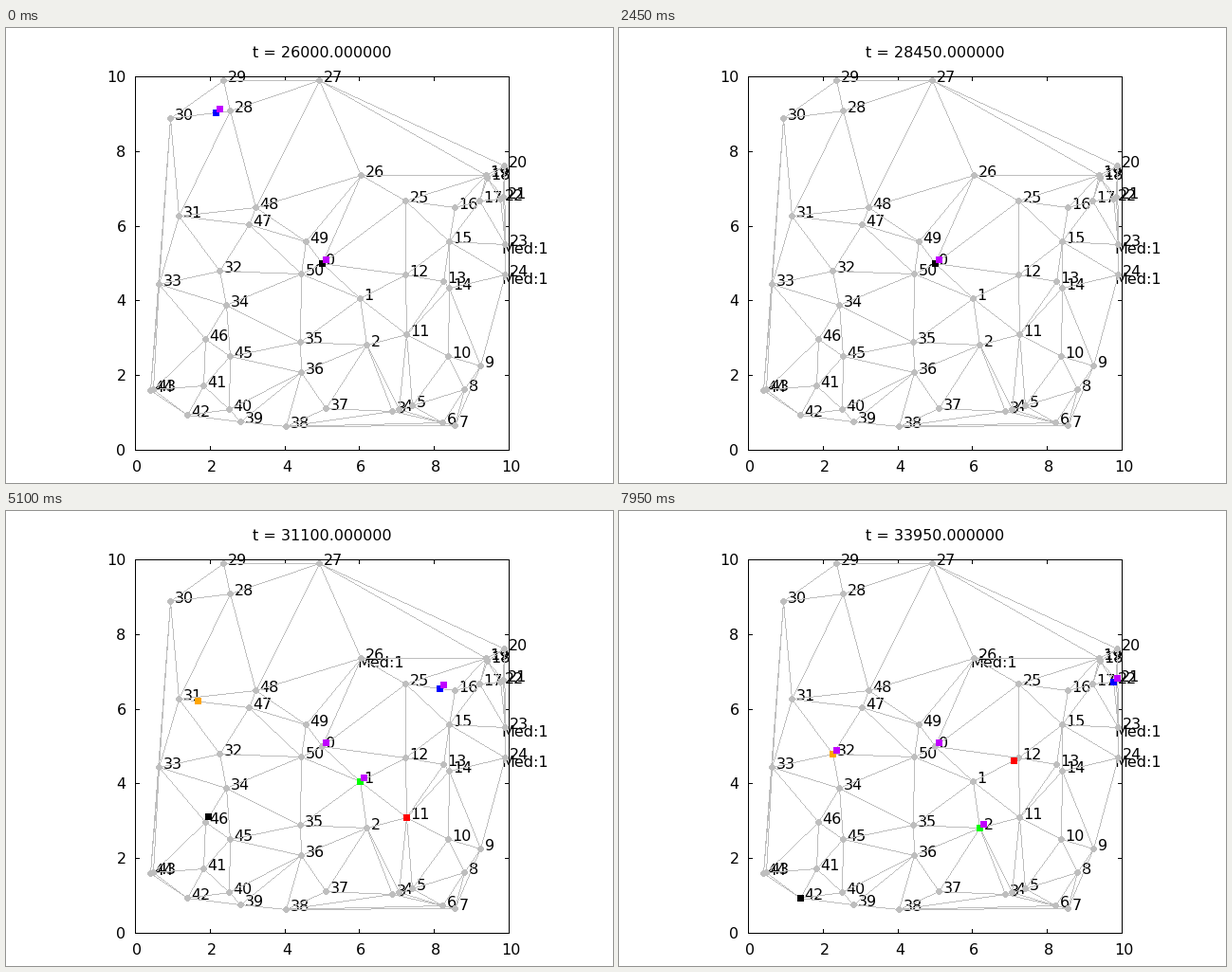
These frames come from a looping animation (640 by 480 pixels, 8000 ms). A matplotlib script:

```python
import numpy as np
import matplotlib.pyplot as plt
from matplotlib.animation import FuncAnimation
from matplotlib.colors import to_rgba
from matplotlib.tri import Triangulation

W, H, DPI = 640, 480, 100
STEP, LOOP = 50, 8000
GROUND, AIR = 0.1093, 0.2186   # speeds in pixels per ms
GRAY, PURPLE = "#bebebe", "#c000ff"
LIFT = np.array([4, -4])       # carried squares sit up and right
L, R, T, B = 136, 530, 51, 445  # plot frame

NODES = np.array([
    (333, 248), (373, 285), (380, 334), (407, 404), (414, 402), (428, 398),
    (460, 416), (473, 419), (483, 381), (500, 356), (466, 346), (422, 323),
    (421, 260), (461, 267), (467, 274), (467, 225), (473, 189), (499, 182),
    (507, 158), (506, 155), (525, 145), (524, 178), (521, 180), (526, 228),
    (526, 260), (421, 182), (374, 155), (330, 55), (236, 87), (229, 55),
    (173, 95), (182, 198), (225, 256), (161, 270), (232, 292), (310, 331),
    (311, 363), (337, 401), (295, 420), (247, 415), (235, 402), (208, 377),
    (191, 408), (155, 381), (152, 382), (236, 346), (210, 328), (256, 207),
    (263, 189), (316, 225), (311, 259)])


# --- motion: tracks are rows of (time, x, y) ---

def walk(start, points, speed=GROUND):
    """Timed waypoints along points at constant speed."""
    pts = np.array(points, float)
    gaps = np.hypot(*np.diff(pts, axis=0).T)
    times = start + np.concatenate([[0], np.cumsum(gaps)]) / speed
    return np.column_stack([times, pts])


def route(start, *ids):
    return walk(start, NODES[list(ids)])


def lifted(track):
    return track + [0, *LIFT]


def at(track, t):
    return np.array([np.interp(t, track[:, 0], track[:, k]) for k in (1, 2)])


def ride(track, start, end):
    """The carried part of a track between two times."""
    up = lifted(track)
    inner = up[(up[:, 0] > start) & (up[:, 0] < end)]
    ends = [[t, *at(up, t)] for t in (start, end)]
    return np.vstack([ends[0], inner, ends[1]])


GO = 3765
green = np.vstack([route(GO, 0, 1), route(6067, 1, 2)])
blue = np.vstack([walk(0, [(221, 89), *NODES[[28, 48, 49, 0]]]),
                  route(GO, 0, 25, 16, 17, 22, 21), route(7300, 21, 22)])
orange = np.vstack([route(GO, 0, 49, 47, 31), route(7110, 31, 32)])
red = np.vstack([route(GO, 0, 1, 11), route(6940, 11, 1, 12)])
black = np.vstack([route(GO, 0, 50, 34, 46, 41), route(7421, 41, 42)])

# flyers: one stays home, one rides along, two change carriers
LAUNCH, TAKEOFF, MEET = 3870, 5868, 7376
home = NODES[0] + LIFT
rest_fly = np.array([[0, *home]])
swap_fly = np.vstack([ride(blue, 0, GO), [LAUNCH, *home],
                      ride(blue, 2 * LAUNCH - GO, TAKEOFF),
                      ride(orange, MEET, LOOP)])
relay_fly = np.vstack([walk(TAKEOFF, [home, NODES[11]], AIR),
                       walk(6930, [NODES[11], NODES[22] + LIFT], AIR)])

MOVERS = [(green, "#00ff00"), (blue, "#0000ff"), (orange, "#ffa500"),
          (red, "#ff0000"), (black, "#000000"), (rest_fly, PURPLE),
          (lifted(green), PURPLE), (swap_fly, PURPLE), (relay_fly, PURPLE)]


# --- pixel painting, without smoothing ---

def rgba(color):
    return np.round(255 * np.array(to_rgba(color)))


def line(img, p, q, color):
    n = int(max(abs(q[0] - p[0]), abs(q[1] - p[1]))) + 1
    xs, ys = (np.floor(np.linspace(a, b, n) + 0.5).astype(int)
              for a, b in zip(p, q))
    img[ys, xs] = rgba(color)


def square(img, p, color):
    x, y = np.floor(p + 0.5).astype(int)
    img[y - 3:y + 4, x - 3:x + 4] = rgba(color)


def disc(img, p, color):
    y, x = np.ogrid[:H, :W]
    img[(x - p[0]) ** 2 + (y - p[1]) ** 2 <= 10] = rgba(color)


plt.rcParams["font.family"] = "DejaVu Sans"
plt.rcParams["font.size"] = 16 * 72 / DPI
fig = plt.figure(figsize=(W / DPI, H / DPI), dpi=DPI, facecolor="white")
ax = fig.add_axes([0, 0, 1, 1])
ax.axis("off")


def write(x, y, s, ha="left"):
    return ax.text(x, y, s, ha=ha, va="baseline", zorder=1)


def med(node):
    x, y = NODES[node]
    return write(x - 4, y + 9.5, "Med:1")


base = np.zeros((H, W, 4), np.uint8)

for p, q in (((L, T), (R, T)), ((L, B), (R, B)),
             ((L, T), (L, B)), ((R, T), (R, B))):
    line(base, p, q, "black")
for v in range(0, 11, 2):
    x = round(L + (R - L) * v / 10)
    y = round(B - (B - T) * v / 10)
    for edge, inward in ((T, 4), (B, -4)):
        line(base, (x, edge), (x, edge + inward), "black")
    for edge, inward in ((L, 4), (R, -4)):
        line(base, (edge, y), (edge + inward, y), "black")
    write(x + 1.5, 467.5, str(v), "center")
    write(126, y + 5.5, str(v), "right")

# the roads are the Delaunay triangulation of the nodes
for a, b in Triangulation(*NODES.T).edges:
    line(base, NODES[a], NODES[b], GRAY)
for i, (x, y) in enumerate(NODES):
    disc(base, (x, y), GRAY)
    write(x + 4, y + 1.5, str(i))

med(23)
med(24)
new_med = med(26)
title = write(332.8, 30.5, "", "center")
view = ax.imshow(base, extent=(-0.5, W - 0.5, H - 0.5, -0.5), aspect="auto",
                 interpolation="nearest", zorder=2)


def draw(frame):
    t = frame * STEP
    title.set_text(f"t = {26000 + t:.6f}")
    new_med.set_visible(t >= GO)
    img = base.copy()
    for track, color in MOVERS:
        square(img, at(track, t), color)
    view.set_data(img)
    return [title, new_med, view]


anim = FuncAnimation(fig, draw, frames=LOOP // STEP, interval=STEP,
                     repeat=True, repeat_delay=0)
plt.show()
```
